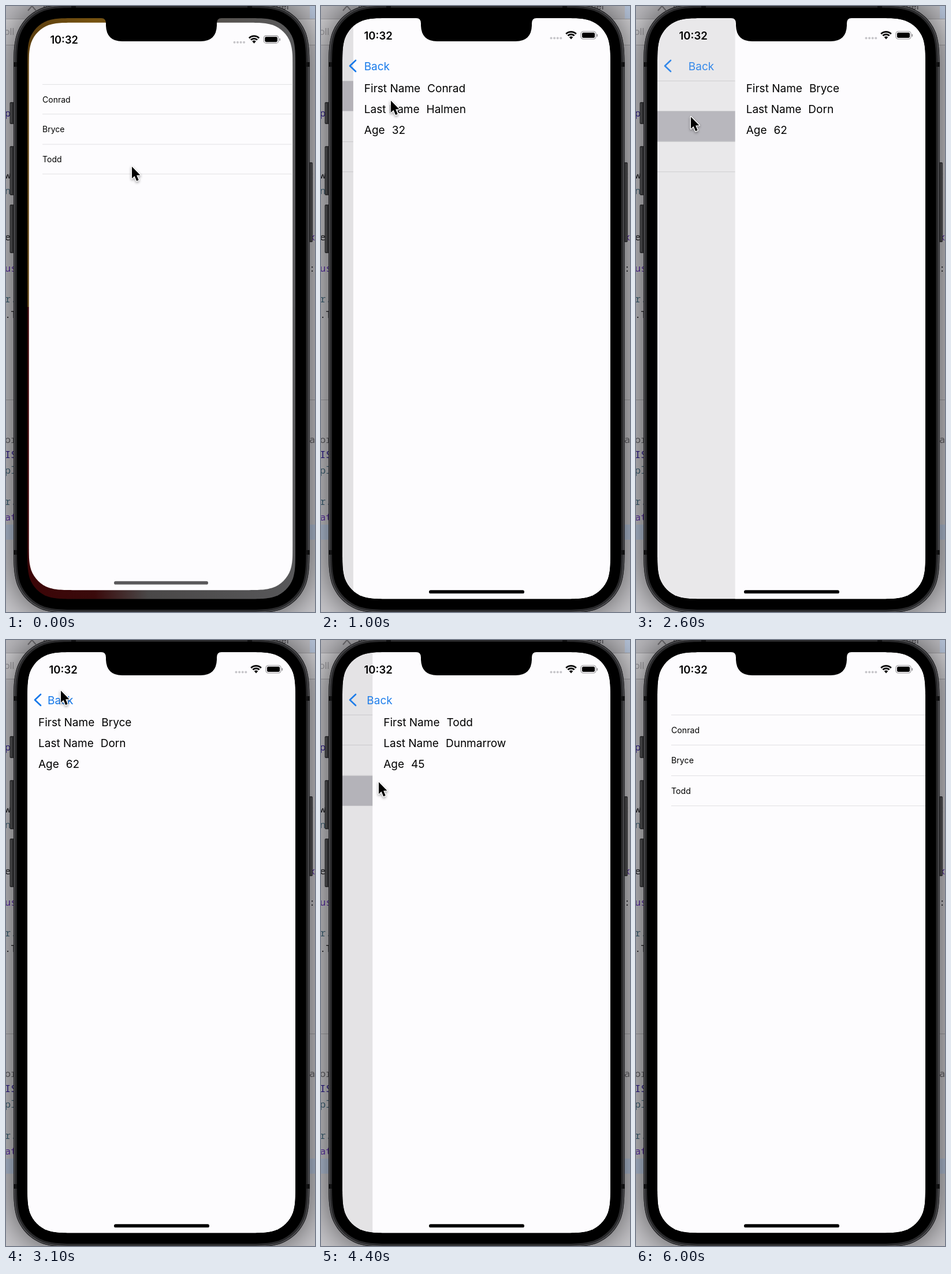
An HTML page with a canvas that plays this animation: 535 by 1047 pixels, repeating every 6100 ms.

```html
<!DOCTYPE html>
<html lang="en">
<head>
<meta charset="utf-8">
<title>List and detail</title>
<style>
html, body { margin: 0; width: 100%; height: 100%; overflow: hidden; background: #000; }
canvas { display: block; width: 535px; height: 1047px; }
</style>
</head>
<body>
<canvas id="stage" width="535" height="1047"></canvas>
<script>
const canvas = document.getElementById('stage');
const W = 535, H = 1047, LOOP = 6100, STEP = 100;
const SCREEN = { x: 37, y: 21, w: 464, h: 1003.5, r: 56 };
const UI = 'Inter, "Liberation Sans", sans-serif';
const MONO = '"Noto Sans Mono", "DejaVu Sans Mono", monospace';
const PAPER = '#fdfcfe';

const people = [
  { first: 'Conrad', last: 'Halmen', age: 32 },
  { first: 'Bryce', last: 'Dorn', age: 62 },
  { first: 'Todd', last: 'Dunmarrow', age: 45 }
];

// When each detail page opens and closes, in ms.
const visits = [
  { row: 0, push: 773, pop: 1805 },
  { row: 1, push: 2487, pop: 3470 },
  { row: 2, push: 4230, pop: 5170 }
];

// Pointer stops: time, x, y.
const stops = [
  [0, 217, 276], [620, 119, 162], [1020, 120, 162], [1720, 91, 91],
  [1860, 91, 91], [2320, 94, 190], [2620, 94, 190], [3080, 94, 86],
  [3520, 94, 87], [4180, 99, 244], [4420, 99, 244], [5080, 93, 90],
  [5260, 93, 90], [5620, 96, 100], [5720, 96, 100], [6000, 60, -40], [6100, 60, -40]
];

function box(c, x, y, w, h, r, fill) {
  c.beginPath();
  c.roundRect(x, y, w, h, r);
  c.fillStyle = fill;
  c.fill();
}

// Rounded rectangle whose corners ease into the straight sides.
function smoothRect(c, { x, y, w, h, r }) {
  const corner = (cx, cy, ux, uy, vx, vy) => {
    const at = (u, v) => [cx + r * (u * ux + v * vx), cy + r * (u * uy + v * vy)];
    c.lineTo(...at(1.529, 0));
    c.bezierCurveTo(...at(1.088, 0), ...at(0.868, 0), ...at(0.631, 0.075));
    c.bezierCurveTo(...at(0.373, 0.169), ...at(0.169, 0.373), ...at(0.075, 0.631));
    c.bezierCurveTo(...at(0, 0.868), ...at(0, 1.088), ...at(0, 1.529));
  };
  c.beginPath();
  corner(x + w, y, -1, 0, 0, 1);
  corner(x + w, y + h, 0, -1, -1, 0);
  corner(x, y + h, 1, 0, 0, -1);
  corner(x, y, 0, 1, 1, 0);
  c.closePath();
}

// The phone body, d pixels in from its outer edge.
function shell(c, d, fill) {
  smoothRect(c, { x: 13 + d, y: -3 + d, w: 512.5 - 2 * d, h: 1052 - 2 * d, r: 80 - d });
  c.fillStyle = fill;
  c.fill();
}

function text(c, str, x, y, size, color, weight = 400, family = UI) {
  c.font = `${weight} ${size}px ${family}`;
  c.fillStyle = color;
  c.fillText(str, x, y);
  return c.measureText(str).width;
}

function line(c, points, width, color) {
  c.beginPath();
  points.forEach(([x, y]) => c.lineTo(x, y));
  c.lineWidth = width;
  c.strokeStyle = color;
  c.stroke();
}

function paintEditor(c) {
  c.fillStyle = '#cbcace';
  c.fillRect(0, 0, W, H);
  c.fillStyle = '#bdbcc0';
  c.fillRect(0, 0, W, 22);
  c.fillStyle = '#d4d3d6';
  c.fillRect(0, 23, W, 44);
  c.fillStyle = '#b8c6dc';
  c.fillRect(0, 896, W, 26);
  c.fillRect(526, 0, 9, 22);
  c.fillStyle = '#a3a2a6';
  for (const y of [22, 67, 680]) c.fillRect(0, y, W, 1);
  line(c, [[38, 8], [45, 0], [52, 8]], 2, '#77767a');
  text(c, 'lib', 64, 6, 16, '#555458');
  text(c, 'nel', 467, 6, 16, '#555458');
  text(c, 'oll', -3, 50, 16, '#9b9a9e');

  const ink = { k: '#1b1b1f', p: '#5a2ca8', n: '#2c1a8c', t: '#3f6478', g: '#626166' };
  const left = [
    ['p', 'n', 191], ['w', 'k', 298], ['n', 't', 325], ['e', 'k', 405],
    ['us', 'p', 459], ['r.', 't', 512], ['.T', 'k', 539], ['or', 'g', 755],
    ['IS', 'n', 781], ['pl', 't', 808], ['r.', 't', 862], ['at', 'p', 889]
  ];
  const right = [[':', 'k', 298], ['x', 'p', 405], [':', 'k', 459], ['a', 'g', 755]];
  for (const [s, k, y] of left) text(c, s, -2, y, 17, ink[k], 500, MONO);
  for (const [s, k, y] of right) text(c, s, 525, y, 17, ink[k], 500, MONO);
}

function paintPhone(c) {
  c.save();
  c.shadowColor = 'rgba(0,0,0,.66)';
  c.shadowBlur = 60;
  shell(c, 0, '#1d1d1f');
  c.restore();

  for (const [y, h] of [[166, 38], [242, 85], [343, 84]]) {
    box(c, 6.5, y, 9, h, 2, '#2b2b2d');
    box(c, 8, y + 2, 2, h - 4, 1, '#454547');
  }
  box(c, 524, 270, 7, 138, 2, '#2b2b2d');
  box(c, 527.5, 272, 2, 134, 1, '#454547');

  shell(c, 0, '#1a1a1c');
  shell(c, 1, '#555558');
  shell(c, 2.5, '#29292b');
  c.fillStyle = '#111112';
  for (const y of [97, 940]) {
    c.fillRect(13, y, 6, 8);
    c.fillRect(520, y, 6, 8);
  }
  c.fillRect(113, 0, 8, 4);
  c.fillRect(418, 0, 8, 4);
  shell(c, 6, '#000');
}

const back = document.createElement('canvas');
back.width = W;
back.height = H;
paintEditor(back.getContext('2d'));
paintPhone(back.getContext('2d'));

const c = canvas.getContext('2d');
const spring = ms => ms <= 0 ? 1 : (1 + 0.022 * ms) * Math.exp(-0.022 * ms);

// How much of the screen the detail page covers, 0 to 1.
function cover(v, t) {
  const p = t < v.pop ? 1 - spring(t - v.push) : spring(t - v.pop);
  return p < 0.002 ? 0 : p > 0.998 ? 1 : p;
}

function pointer(t) {
  const i = stops.findIndex(s => s[0] > t);
  const [t0, x0, y0] = stops[i - 1], [t1, x1, y1] = stops[i];
  const u = (t - t0) / (t1 - t0), e = u * u * (3 - 2 * u);
  return [x0 + (x1 - x0) * e, y0 + (y1 - y0) * e];
}

function drawList(p, row, touched) {
  c.fillStyle = PAPER;
  c.fillRect(SCREEN.x, 0, SCREEN.w, H);
  c.save();
  c.translate(-0.3 * SCREEN.w * p, 0);
  const top = 129, pitch = 52.4;
  if (touched) {
    c.globalAlpha = touched;
    c.fillStyle = '#c8c6cd';
    c.fillRect(SCREEN.x, top + row * pitch, SCREEN.w, pitch);
    c.globalAlpha = 1;
  }
  c.fillStyle = '#e1e0e3';
  for (let i = 0; i < 4; i++) c.fillRect(61, top + Math.round(i * pitch), 440, 1);
  people.forEach((who, i) => text(c, who.first, 61, 161 + i * pitch, 14.2, '#000'));
  c.restore();
  c.fillStyle = `rgba(0,0,0,${0.11 * p})`;
  c.fillRect(SCREEN.x, 0, SCREEN.w, H);
}

function drawDetail(who, off) {
  c.fillStyle = PAPER;
  c.fillRect(SCREEN.x + off, 0, SCREEN.w, H);
  const rows = [['First Name', who.first], ['Last Name', who.last], ['Age', who.age]];
  rows.forEach(([label, value], i) => {
    const x = 56 + off, y = 149 + 36 * i;
    const w = text(c, label, x, y, 19, '#000');
    text(c, String(value), x + w + 12, y, 19, '#000');
  });
}

function drawBack(off, alpha) {
  c.globalAlpha = alpha;
  c.lineCap = c.lineJoin = 'round';
  line(c, [[60, 94], [50, 103.5], [60, 113]], 2.7, '#1478ea');
  text(c, 'Back', 72 + 0.14 * off, 110.5, 19, '#1478ea');
  c.globalAlpha = 1;
}

function drawStatus() {
  text(c, '10:32', 74.5, 57.5, 18.5, '#000', 600);
  for (let i = 0; i < 4; i++) box(c, 396.5 + 5.6 * i, 53.5, 4, 4, 2, '#c6c5c9');

  c.lineCap = 'butt';
  c.strokeStyle = '#000';
  c.lineWidth = 2.8;
  const a = Math.PI * 0.25;
  for (const r of [12.4, 8]) {
    c.beginPath();
    c.arc(433, 57, r, -Math.PI + a, -a);
    c.stroke();
  }
  c.beginPath();
  c.moveTo(433, 57.5);
  c.arc(433, 57, 4.6, -Math.PI + a, -a);
  c.fillStyle = '#000';
  c.fill();

  c.beginPath();
  c.roundRect(450, 44, 26, 13, 4);
  c.lineWidth = 1.1;
  c.strokeStyle = '#8d8c90';
  c.stroke();
  box(c, 452, 46, 22, 9, 2.2, '#000');
  box(c, 477.5, 48.5, 1.6, 4.5, 1, '#8d8c90');
}

function drawWallpaper() {
  const half = (y, h, shades) => {
    const g = c.createLinearGradient(37, 0, 501, 0);
    shades.forEach(([at, color]) => g.addColorStop(at, color));
    c.fillStyle = g;
    c.fillRect(37, y, 464, h);
  };
  half(0, 520, [[0, '#5c3f10'], [0.25, '#76520f'], [0.6, '#55504a'], [1, '#59595b']]);
  half(520, 527, [[0, '#3c0507'], [0.25, '#3a0a0b'], [0.45, '#4a4848'], [1, '#58585a']]);
}

function drawNotch() {
  c.beginPath();
  c.moveTo(165, 18);
  c.lineTo(165, 21);
  c.quadraticCurveTo(173, 21, 173, 30);
  c.lineTo(173, 34);
  c.quadraticCurveTo(174, 61, 201, 61);
  c.lineTo(337, 61);
  c.quadraticCurveTo(364, 61, 365, 34);
  c.lineTo(365, 30);
  c.quadraticCurveTo(365, 21, 373, 21);
  c.lineTo(373, 18);
  c.fillStyle = '#000';
  c.fill();
}

function drawPointer([x, y]) {
  c.save();
  c.translate(x + 1, y + 1.5);
  c.scale(0.95, 0.95);
  c.beginPath();
  [[0, 0], [0, 21.5], [4.8, 17.2], [8.6, 26], [12.3, 24.4], [8.6, 15.8], [15.2, 15.4]]
    .forEach(([px, py]) => c.lineTo(px, py));
  c.closePath();
  c.lineJoin = 'round';
  c.lineWidth = 2.8;
  c.strokeStyle = '#fff';
  c.shadowColor = 'rgba(0,0,0,.4)';
  c.shadowBlur = 4;
  c.shadowOffsetY = 2;
  c.stroke();
  c.shadowColor = 'transparent';
  c.fillStyle = '#000';
  c.fill();
  c.restore();
}

function clipTo(shape) {
  smoothRect(c, shape);
  c.clip();
}

function draw(t) {
  const visit = visits.filter(v => t >= v.push).pop() || visits[0];
  const p = cover(visit, t), off = SCREEN.w * (1 - p);
  const zoom = Math.max(0, 1 - t / 150);

  c.drawImage(back, 0, 0);
  c.save();
  clipTo(SCREEN);
  if (zoom) drawWallpaper();
  c.save();
  const k = 1 - 0.015 * zoom;
  c.translate(3 * zoom, 8 * zoom);
  c.scale(k, k);
  clipTo({ ...SCREEN, h: SCREEN.h - 8 * zoom });
  const open = t >= visit.push && t < visit.pop;
  drawList(p, visit.row, open ? 1 : p);
  if (p) {
    drawDetail(people[visit.row], off);
    const pressed = t >= visit.pop - 80 && t < visit.pop;
    drawBack(off, pressed ? 0.22 : Math.sqrt(p));
  }
  drawStatus();
  c.restore();
  box(c, 187, 1009.3 - 15.5 * zoom, 165 - 2 * zoom, 5.8, 2.9, zoom ? '#5a595b' : '#000');
  c.restore();

  drawNotch();
  drawPointer(pointer(t));
}

function tick() {
  const t = performance.now() % LOOP;
  draw(Math.floor(t / STEP) * STEP);
  requestAnimationFrame(tick);
}
tick();
</script>
</body>
</html>
```
